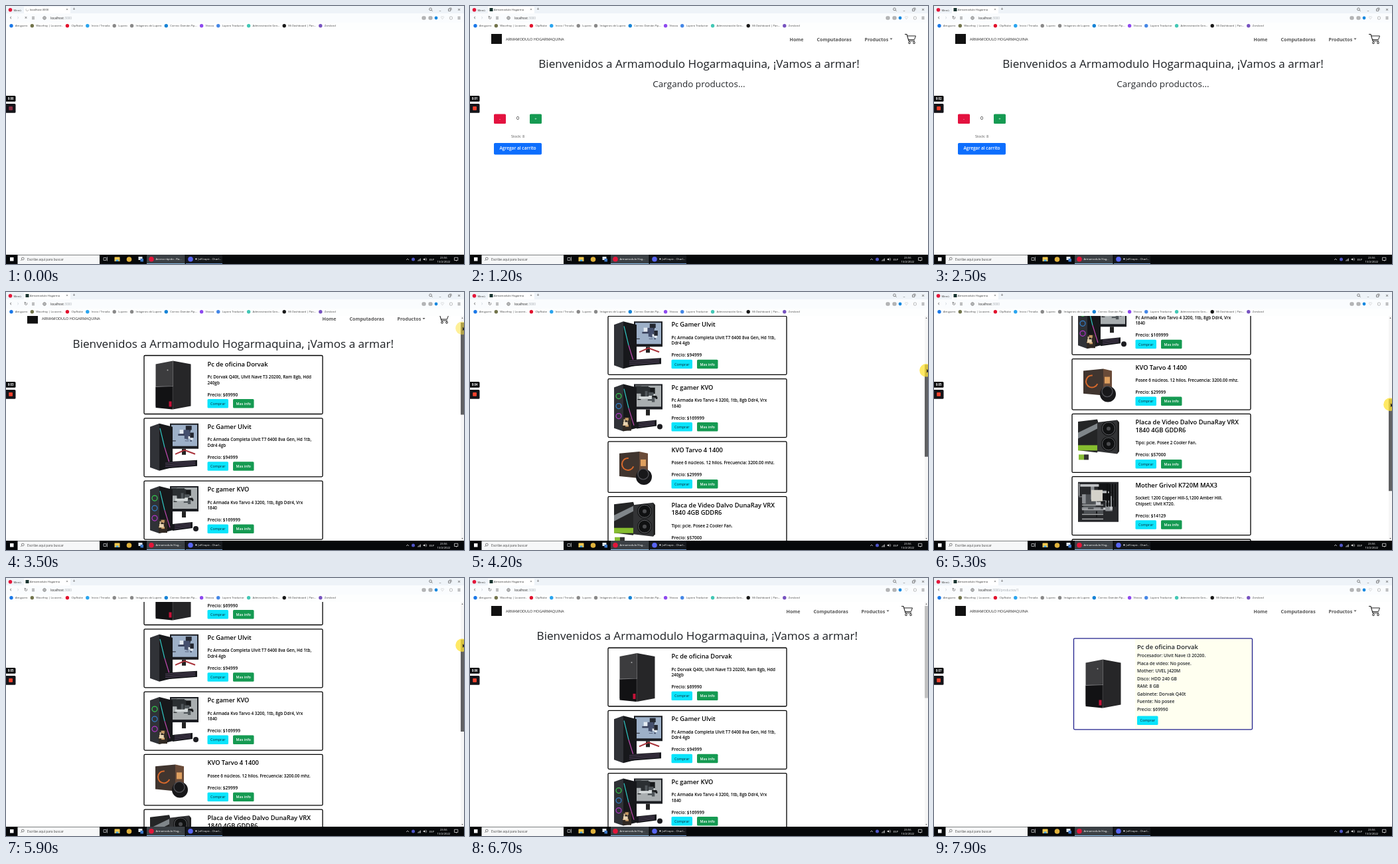
An HTML page with a canvas for the animation above (8000 ms loop, 690 px wide and 388 px high).

```html
<!DOCTYPE html>
<html lang="es">
<head>
<meta charset="utf-8">
<title>Armamodulo Hogarmaquina</title>
<style>
html, body { margin: 0; width: 100%; height: 100%; overflow: hidden; background: #fff; }
canvas { display: block; width: 690px; height: 388px; }
</style>
</head>
<body>
<canvas id="stage"></canvas>
<script>
const W = 690, H = 388, LOOP = 8000, STEP = 100;
const LOADED = 600, LISTED = 2600, DRAG_START = 3400, DRAG_END = 6500, DETAIL = 7200;
const SHOP = 'Armamodulo Hogarmaquina';
const FONT = '"Open Sans", "Noto Sans", "DejaVu Sans", sans-serif';
const INK = '#555';
const canvas = document.getElementById('stage');
const ctx = canvas.getContext('2d');
const dpr = window.devicePixelRatio || 1;
canvas.width = W * dpr;
canvas.height = H * dpr;

// Drawing helpers
function rect(color, x, y, w, h, r = 0) {
  ctx.fillStyle = color;
  ctx.beginPath();
  ctx.roundRect(x, y, w, h, r);
  ctx.fill();
}
function frame(color, x, y, w, h, r = 0, lw = 0.7) {
  ctx.strokeStyle = color;
  ctx.lineWidth = lw;
  ctx.beginPath();
  ctx.roundRect(x, y, w, h, r);
  ctx.stroke();
}
function trace(pts) {
  ctx.beginPath();
  for (let i = 0; i < pts.length; i += 2) ctx.lineTo(pts[i], pts[i + 1]);
}
function poly(color, ...pts) {
  trace(pts);
  ctx.fillStyle = color;
  ctx.fill();
}
function line(color, lw, ...pts) {
  trace(pts);
  ctx.strokeStyle = color;
  ctx.lineWidth = lw;
  ctx.stroke();
}
function disc(color, x, y, r) {
  ctx.fillStyle = color;
  ctx.beginPath();
  ctx.arc(x, y, r, 0, 7);
  ctx.fill();
}
function ring(color, x, y, r, lw = 0.7, from = 0, to = 2 * Math.PI) {
  ctx.strokeStyle = color;
  ctx.lineWidth = lw;
  ctx.beginPath();
  ctx.arc(x, y, r, from, to);
  ctx.stroke();
}
function text(s, x, y, size, color = '#111', weight = 400, align = 'left') {
  ctx.font = `${weight} ${size}px ${FONT}`;
  ctx.fillStyle = color;
  ctx.textAlign = align;
  ctx.fillText(s, x, y);
  return ctx.measureText(s).width;
}
const centered = (s, x, y, size, color, weight) => text(s, x, y, size, color, weight, 'center');

// A symbol centred on a point
function icon(glyph, x, y, size = 6, color = INK) {
  ctx.textBaseline = 'middle';
  centered(glyph, x, y, size, color);
  ctx.textBaseline = 'alphabetic';
}
function lens(x, y, dir) {
  ring(INK, x, y, 1.9);
  line(INK, 0.8, x + dir * 1.4, y + 1.4, x + dir * 3, y + 3);
}
function button(label, x, y, color, ink, weight) {
  rect(color, x, y, 31.5, 13.5, 1.5);
  centered(label, x + 15.75, y + 8.8, 5.4, ink, weight);
}
const buyButton = (x, y) => button('Comprar', x, y, '#0ae4fb', '#123', 400);

function seeded(seed) {
  return () => (seed = seed * 16807 % 2147483647) / 2147483647;
}

// Scroll position: monotone curve through a few drag points
const DRAG_PATH = [[3300, 0], [3500, 9.5], [4200, 163], [4800, 264.5], [5150, 300], [5900, 122.5], [6400, 0]];
function slopeAt(i) {
  const p = DRAG_PATH;
  if (i === 0 || i === p.length - 1) return 0;
  const a = (p[i][1] - p[i - 1][1]) / (p[i][0] - p[i - 1][0]);
  const b = (p[i + 1][1] - p[i][1]) / (p[i + 1][0] - p[i][0]);
  return a * b <= 0 ? 0 : 2 * a * b / (a + b);
}
function scrollAt(t) {
  const i = DRAG_PATH.findIndex(p => p[0] > t) - 1;
  if (i < 0) return 0;
  const [t0, s0] = DRAG_PATH[i], [t1, s1] = DRAG_PATH[i + 1];
  const d = t1 - t0, u = (t - t0) / d, v = 1 - u;
  return s0 * v * v * (1 + 2 * u) + s1 * u * u * (3 - 2 * u)
    + d * u * v * (v * slopeAt(i) - u * slopeAt(i + 1));
}

// Product pictures, built from a two-sided box and seeded shards
function prism(x, y, w, h, fold, front, side) {
  const d = h * 0.07;
  poly(front, x, y + d, x + fold, y, x + fold, y + h, x, y + h - d);
  poly(side, x + fold, y, x + w, y + d, x + w, y + h - d, x + fold, y + h);
}
function shards(x, y, w, h, colors, count, seed) {
  const rnd = seeded(seed);
  for (let i = 0; i < count; i++) {
    const px = x + rnd() * w * 0.8, py = y + rnd() * h * 0.8;
    rect(colors[i % colors.length], px, py, (x + w - px) * rnd() * 0.6, (y + h - py) * rnd() * 0.6);
  }
}
function keyboard(x, y, w) {
  poly('#17181c', x, y + 3, x + w, y, x + w, y + 9, x, y + 13);
  for (let i = 1; i < 4; i++) line('#6b5578', 0.7, x + 3, y + 2 + i * 2.6, x + w - 3, y + i * 2.2);
}
function gamingCase() {
  prism(0, 0, 34, 71, 14, '#303237', '#17181b');
  line('#31c8c4', 1.2, 15, 7, 22, 36);
  line('#c04ab0', 1.2, 22, 36, 30, 62);
}
function monitor(colors, seed) {
  rect('#1b1d22', 30, 0, 43, 38);
  rect(colors[0], 32, 2, 39, 32);
  shards(32, 2, 39, 32, colors.slice(1), 18, seed);
  rect('#222', 48, 38, 6, 9);
}

function tower() {
  prism(0, 0, 53, 73, 26, '#3c3c3e', '#262628');
  prism(0, 37, 26, 36, 25, '#121214', '#121214');
  line('#a0a0a2', 0.7, 0, 39, 26, 38);
  disc('#aaa', 18, 14, 1);
  rect('#c41238', 20, 61, 4, 8);
}
function gamerSet() {
  monitor(['#9db0c8', '#23262f', '#45506e', '#e4ebf2', '#38405a'], 7);
  line('#a8323a', 2, 38, 46, 52, 40, 68, 46);
  gamingCase();
  keyboard(20, 55, 51);
}
function battleSet() {
  monitor(['#a9aeb0', '#2b2f32', '#50565a', '#d5dadb', '#17191b'], 23);
  gamingCase();
  for (let i = 0; i < 3; i++) ring(`hsl(${130 + i * 80} 60% 50%)`, 7, 18 + i * 15, 4, 1.2);
  keyboard(34, 54, 30);
  disc('#1c1c20', 69, 64, 4);
  rect('#302923', 13, 50, 13, 20);
  shards(13, 50, 13, 20, ['#c69a65', '#e8d3b0'], 6, 5);
}
function boxedCpu() {
  prism(8, 2, 43, 40, 30, '#40352f', '#6a4b38');
  ring('#d7692c', 21, 21, 9, 2, 0.4, 4.8);
  rect('#dfa05f', 40, 14, 8, 10);
  disc('#18181a', 45, 40, 12);
  ring('#515156', 44, 36, 8, 1.3);
}
function graphicsCard() {
  prism(0, 0, 30, 50, 29, '#242526', '#111');
  poly('#80868a', 0, 20, 29, 6, 29, 14, 0, 29);
  rect('#86bd2f', 0, 39, 29, 8);
  prism(29, 1, 33, 51, 30, '#323335', '#222');
  for (const y of [14, 37]) {
    disc('#101112', 46, y, 11);
    ring('#77787b', 46, y, 9.5, 0.8);
    disc('#4a4b4e', 46, y, 3);
  }
  rect('#88bd36', 1, 53, 8, 8);
  rect('#333', 9, 53, 7, 8);
}
function motherboard() {
  rect('#28292c', 0, 0, 61, 60);
  shards(1, 1, 59, 58, ['#8d9094', '#131416', '#c3c5c8', '#4d5054'], 36, 11);
  rect('#d4d2ca', 20, 12, 17, 17);
  for (let i = 0; i < 4; i++) {
    rect('#0e0f10', 43 + i * 4, 3, 2, 34);
    rect('#a9abad', 6, 34 + i * 7, 32, 1.5);
  }
}
function place(pic, x, y) {
  ctx.save();
  ctx.translate(x, y);
  pic();
  ctx.restore();
}

const ITEMS = [
  { pic: tower, inset: 17.5, title: ['Pc de oficina Dorvak'], price: 69990,
    info: ['Pc Dorvak Q40t, Ulvit Nave T3 20200, Ram 8gb, Hdd', '240gb'] },
  { pic: gamerSet, title: ['Pc Gamer Ulvit'], price: 94999,
    info: ['Pc Armada Completa Ulvit T7 6400 8va Gen, Hd 1tb,', 'Ddr4 4gb'] },
  { pic: battleSet, title: ['Pc gamer KVO'], price: 169999,
    info: ['Pc Armada Kvo Tarvo 4 3200, 1tb, 8gb Ddr4, Vrx', '1840'] },
  { pic: boxedCpu, title: ['KVO Tarvo 4 1400'], price: 29999,
    info: ['Posee 6 núcleos. 12 hilos. Frecuencia: 3200.00 mhz.'] },
  { pic: graphicsCard, title: ['Placa de Video Dalvo DunaRay VRX', '1840 4GB GDDR6'], price: 57000,
    info: ['Tipo: pcie. Posee 2 Cooler Fan.'] },
  { pic: motherboard, title: ['Mother Grivol K720M MAX3'], price: 14129,
    info: ['Socket: 1200 Copper Hill-S,1200 Amber Hill.', 'Chipset: Ulvit K720.'] },
  { title: ['Memoria Ram 8gb Ddr4'], price: 4990, info: ['Frecuencia: 3200 mhz.'] }
];
const SPECS = ['Procesador: Ulvit Nave i3 20200.', 'Placa de video: No posee.', 'Mother: UVEL J420M',
  'Disco: HDD 240 GB', 'RAM: 8 GB', 'Gabinete: Dorvak Q40t', 'Fuente: No posee', 'Precio: $69990'];

// Draws one card and returns the top of the next
function itemCard({ pic, inset = 9, title, info, price }, top) {
  const x = 303.5, h = title.length + info.length > 2 ? 88 : 76.5;
  frame('#000', 208, top, 269, h, 1.5, 1.3);
  if (pic) place(pic, 208 + inset, top + (h > 80 ? 8 : 13));
  let y = top + 4.5;
  for (const s of title) text(s, x, y += 11.5, 9.3, '#000', 600);
  y += 10;
  for (const s of info) text(s, x, y += 8.5, 6.35, '#000', 600);
  text('Precio: $' + price, x, y += 18, 6.6, '#000', 600);
  buyButton(x, y + 4.5);
  button('Mas info', x + 38.5, y + 4.5, '#159a52', '#fff', 600);
  return top + h + 6.3;
}

function cart(x, y) {
  line('#222', 1.1, x, y, x + 3, y, x + 6, y + 10, x + 15, y + 10);
  line('#222', 1, x + 4, y + 2.5, x + 16.5, y + 2.5, x + 14.5, y + 8, x + 5.5, y + 8);
  for (const dx of [7, 14]) ring('#222', x + dx, y + 12.8, 1.4, 1);
}
function siteHeader(shift) {
  rect('#111', 32, 42, 16, 15);
  text(SHOP.toUpperCase(), 54, 51.5, 5.6, '#222');
  ctx.save();
  ctx.translate(shift, 0);
  text('Home', 481.5, 52.7, 7.1, INK, 700);
  text('Computadoras', 522.5, 52.7, 7.1, INK, 700);
  text('Productos', 594.5, 52.7, 7.1, INK, 700);
  poly(INK, 632.5, 48.5, 636.5, 48.5, 634.5, 50.7);
  cart(655, 42.5);
  ctx.restore();
}
function welcome(x) {
  centered(`Bienvenidos a ${SHOP}, ¡Vamos a armar!`, x, 93, 17.1, '#1c1f23');
}

function loadingPage() {
  siteHeader(0);
  welcome(345);
  centered('Cargando productos...', 345, 121.5, 13.5, '#24272b');
  rect('#e3123f', 36, 162.5, 18, 14.5, 1.5);
  rect('#159a52', 90, 162.5, 18, 14.5, 1.5);
  centered('-', 45, 171.8, 6, '#fff');
  centered('+', 99, 171.8, 6, '#fff');
  centered('0', 72, 171.3, 7);
  centered('Stock: 8', 72, 197.5, 5.6, INK);
  rect('#0d6efd', 36, 206, 72, 17.5, 1.8);
  centered('Agregar al carrito', 72, 216.3, 6.6, '#fff', 600);
}

function listPage(t) {
  const scroll = scrollAt(t);
  ctx.save();
  ctx.translate(0, -scroll);
  siteHeader(-5);
  welcome(342.3);
  ITEMS.reduce((top, item) => itemCard(item, top), 105);
  ctx.restore();

  const dragging = t >= DRAG_START && t < DRAG_END;
  const thumb = 42 + scroll * 0.413;
  rect('#f6f6f6', 685, 36, 5, 338);
  icon('▴', 687.5, 39, 4);
  icon('▾', 687.5, 371, 4);
  rect(dragging ? '#606163' : '#c1c1c1', 685, thumb, 5, 138.5);
  if (dragging) {
    const y = thumb + 8.5;
    disc(`rgba(255,226,50,${0.75 * Math.min(1, (t - 3300) / 300)})`, 687, y, 9.8);
    poly('#222', 688, y - 2, 688, y + 4, 690, y + 2, 690, y);
  }
}

function detailPage() {
  siteHeader(0);
  rect('#fffff0', 303, 91, 176, 137);
  frame('#20208c', 210.5, 90.8, 269, 137, 1.5, 1.3);
  place(tower, 228.5, 122.5);
  text('Pc de oficina Dorvak', 306, 107, 9.4, '#212529', 600);
  SPECS.forEach((s, i) => text(s, 306, 119 + i * 11.5, 6.7, '#212529', 600));
  buyButton(306, 207.5);
}

const BOOKMARKS = [
  ['#1877e8', 'Amiguero'], ['#71734a', 'Wavefray | La avent..'], ['#e2112c', 'ClipNube'],
  ['#28a4ef', 'Inicio / Trinalia'], ['#888', 'Lupero'], ['#888', 'Imágenes de Lupero'],
  ['#1683d6', 'Correo: Damián Pip...'], ['#8d48ef', 'Vivoxa'], ['#4386e6', 'Lupero Traductor'],
  ['#41c7b5', 'Administración Gen...'], ['#181818', 'Mi Dashboard | Pan...'], ['#7652bf', 'Zorvland']
];

function tabStrip(t) {
  const busy = t < LOADED;
  rect('#eef3f8', 0, 0, W, 11);
  rect('#fff', 27, 1, 70, 10, 1);
  disc('#e3163a', 6.5, 5.8, 2.8);
  text('Menú', 11.5, 7.5, 4.2, '#333');
  if (busy) ring('#999', 32, 5.5, 2, 0.6, t / 120, t / 120 + 4);
  else rect('#17332f', 29.5, 3, 5, 5);
  text(busy ? 'localhost:3000' : SHOP.slice(0, 18), 36, 7.2, 4.2, '#333');
  icon('×', 92, 5.5);
  icon('+', 102.5, 5.5, 7);
  lens(639.5, 4.8, 1);
  icon('–', 654, 7);
  frame(INK, 666.5, 4.3, 3.2, 3.2);
  line(INK, 0.6, 667.8, 3, 671, 3, 671, 6.2);
  icon('×', 682.5, 5.5, 8);
}

function addressBar(t) {
  rect('#fafcfe', 0, 11, W, 14);
  icon('‹', 7, 17.5, 9);
  icon('›', 18, 17.5, 9, '#ccd2d8');
  icon(t < LOADED ? '×' : '↻', 30, 18, 7);
  for (const x of [41, 682.5])
    for (let i = -1; i < 2; i++) line(INK, 0.6, x - 2, 18 + i * 1.6, x + 2, 18 + i * 1.6);
  ring(INK, 58, 18, 2.3);
  line(INK, 0.5, 55.7, 18, 60.3, 18);
  line(INK, 0.5, 58, 15.7, 58, 20.3);
  const w = text('localhost', 67, 19.7, 4.75, '#222');
  text(t >= DETAIL ? ':3000/productos/1' : ':3000', 67 + w, 19.7, 4.75, '#a2a8ae');
  for (const x of [629.5, 639.5]) {
    frame(INK, x - 2.3, 16, 4.6, 4, 0.7);
    ring(INK, x, 18, 0.9, 0.6);
  }
  disc('#1688e0', 648, 18, 2.4);
  icon('♡', 657.5, 18);
  icon('⬡', 670.4, 18);
}

function bookmarkBar() {
  rect('#fdfefe', 0, 25, W, 11);
  let x = 8;
  for (const [color, label] of BOOKMARKS) {
    disc(color, x, 29.7, 2.7);
    x += 12.8 + text(label, x + 6, 31.2, 4.1, '#444');
  }
}

function taskButton(x, w, fill, edge, dot, label) {
  rect(fill, x, 374, w, 14);
  rect(edge, x, 387, w, 1);
  disc(dot, x + 7, 380.8, 3.8);
  text(label, x + 13.5, 382.4, 4.2, '#fff');
}
function taskbar(t) {
  rect('#06080a', 0, 374, W, 14);
  rect('#fff', 6, 378, 5.5, 5.5);
  rect('#f6f7f8', 17.5, 374.5, 123.5, 13.5);
  lens(25.3, 380, -1);
  text('Escribe aquí para buscar', 32, 382.8, 4.8, '#444');
  frame('#ddd', 147, 378.5, 4, 4);
  line('#ddd', 0.7, 152.5, 377.3, 152.5, 383.5);
  rect('#f2c84f', 163.5, 377.5, 8, 6.5, 0.6);
  rect('#4ba4dc', 165.5, 381.5, 4, 2.5);
  disc('#e0b23c', 185.5, 381, 3.8);
  rect('#dfe7ee', 199.5, 377, 6, 5);
  rect('#3c78c8', 202.5, 380, 4.5, 4.5);

  taskButton(212, 57.5, '#3b4045', '#86b9e4', '#e3163a',
    t < LOADED ? 'Acceso rápido - Ra...' : 'Armamodulo Hog...');
  taskButton(271, 55, '#15181c', '#6a92c8', '#5865f2', '♦|off-topic - Charl...');

  line('#eee', 0.7, 603, 382, 605, 380, 607, 382);
  disc('#4f55c8', 613.5, 381, 2.5);
  for (let i = 0; i < 4; i++) rect('#ddd', 620.3 + i * 1.2, 382.5 - i, 0.8, 1 + i);
  icon('◀', 629.5, 381, 4, '#eee');
  for (const r of [1.5, 3]) ring('#ddd', 630.5, 381, r, 0.6, -0.9, 0.9);
  centered('ESP', 641.3, 382.6, 4.3, '#fff');
  centered('23:56', 659.3, 379.8, 4.2, '#fff');
  centered('13/2/2022', 659.3, 386, 4.2, '#fff');
  frame('#eee', 675.5, 378.3, 5.3, 4.2);
  poly('#eee', 677.4, 382.5, 679, 382.5, 679, 384);
}

function recorder(t) {
  rect('#08090b', -2, 135, 16.5, 8.7, 1.5);
  centered('0:0' + Math.floor(t / 1000), 7.2, 141, 4.4, '#fff', 700);
  rect('#15151a', -2, 147, 16.5, 13.8, 1.5);
  rect(t < LOADED ? '#8a2c42' : '#f4422d', 4.2, 151, 5.8, 5.8, 0.8);
}

function draw(t) {
  ctx.setTransform(dpr, 0, 0, dpr, 0, 0);
  rect('#fff', 0, 0, W, H);
  if (t >= DETAIL) detailPage();
  else if (t >= LISTED) listPage(t);
  else if (t >= LOADED) loadingPage();
  tabStrip(t);
  addressBar(t);
  bookmarkBar();
  taskbar(t);
  recorder(t);
}

function tick() {
  const t = performance.now() % LOOP;
  draw(Math.floor(t / STEP) * STEP);
  requestAnimationFrame(tick);
}
tick();
</script>
</body>
</html>
```
